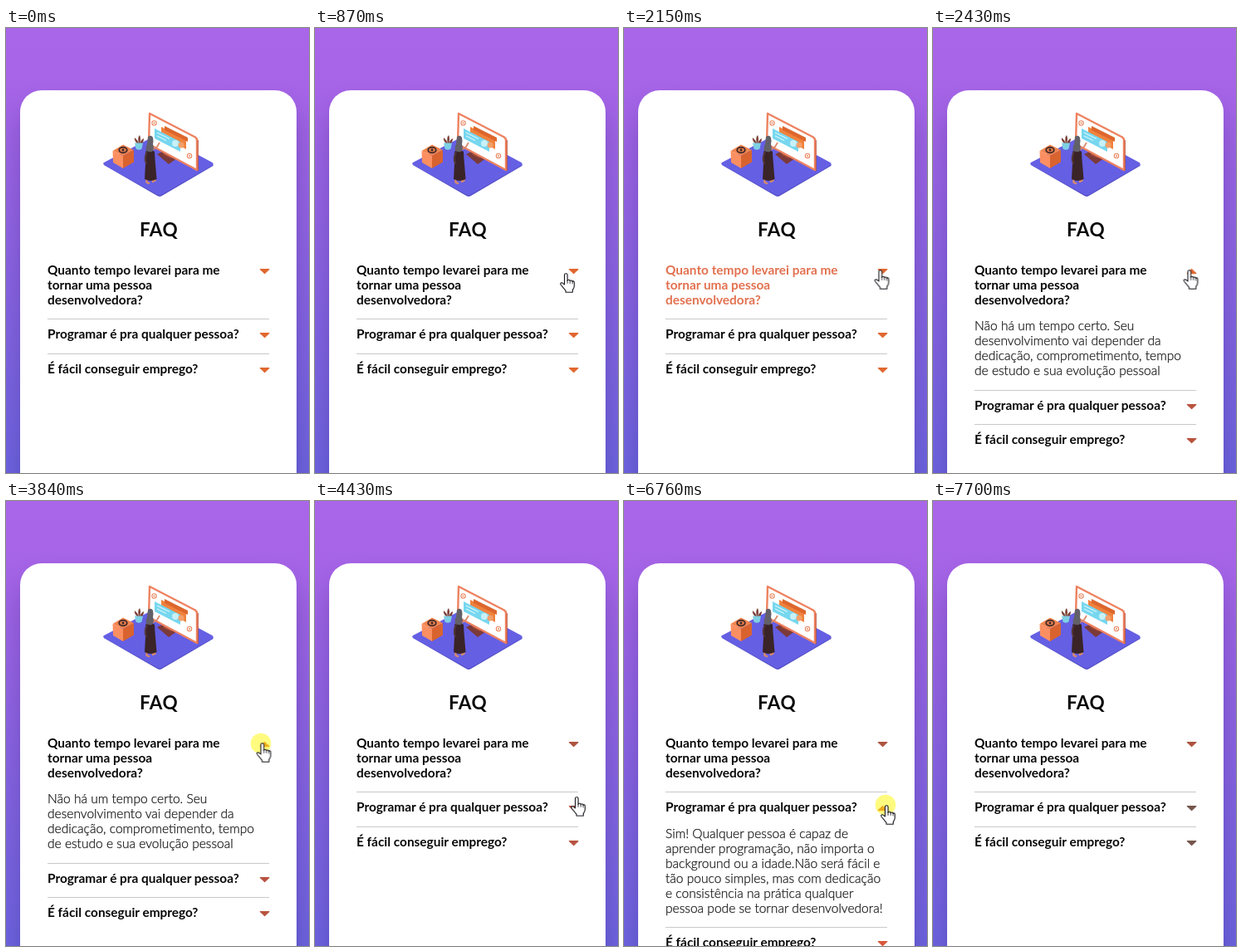
Write an HTML page that moves like this. It is 365 px wide and 536 px high and loops after 8100 ms.

```html
<!DOCTYPE html>
<html lang="pt-BR">
<head>
<meta charset="utf-8">
<title>FAQ</title>
<style>
html, body { margin: 0; width: 100%; height: 100%; overflow: hidden; }
body { position: relative; background: linear-gradient(#aa66e9, #a664e7 13%, #6e64e0); }
.card {
  position: absolute; left: 17px; top: 75px; width: 333px; height: 560px;
  border-radius: 26px; background: #fff; box-shadow: 0 22px 32px rgba(20, 0, 60, .22);
}
svg { position: absolute; left: 0; top: 0; display: block; }
text { font-family: Lato, "Open Sans", sans-serif; fill: #080808; }
.title { font-size: 22.5px; font-weight: 700; letter-spacing: .5px; text-anchor: middle; }
.q text { font-size: 15.4px; font-weight: 700; fill: inherit; }
.q { fill: #080808; }
.a text { font-size: 15.55px; font-weight: 300; fill: #151515; stroke: #151515; stroke-width: .25px; }
.a { opacity: 0; }
.rule { stroke: #c9c9cd; stroke-width: 1; }
.arrow {
  color: #e0672f; fill: currentColor; stroke: currentColor; stroke-linejoin: round;
  transform-box: fill-box; transform-origin: center;
}

/* Everything shares one 8.1 s clock */
.q, .a, .arrow, .mid, .tail, #click, #hand { animation: 8.1s linear infinite; }
.a, .arrow, .mid, .tail, #click { animation-timing-function: step-end; }
#q1 { animation-name: hover1; }
#q2 { animation-name: hover2; }
#a1 { animation-name: show1; }
#a2 { animation-name: show2; }
#t1 { animation-name: flip1; }
#t2 { animation-name: flip2; }
#t3 { animation-name: tint3; }
.mid { animation-name: mid; }
.tail { animation-name: tail; }
#click { animation-name: click; opacity: 0; }
#hand { animation-name: hand; }

@keyframes hover1 {
  0%, 18.15% { fill: #080808; }
  21.48%, 26.54% { fill: #e3714f; }
  30%, 100% { fill: #080808; }
}
@keyframes hover2 {
  0%, 54.69% { fill: #080808; }
  56.6%, 57.28% { fill: #e3714f; }
  59.75%, 100% { fill: #080808; }
}
@keyframes show1 {
  0% { opacity: 0; }
  27.407% { opacity: 1; }
  49.012%, 100% { opacity: 0; }
}
@keyframes show2 {
  0% { opacity: 0; }
  57.284% { opacity: 1; }
  85.185%, 100% { opacity: 0; }
}
@keyframes flip1 {
  0% { transform: none; color: #e0672f; }
  27.407% { transform: scaleY(-1); color: #e0672f; }
  49.012%, 100% { transform: none; color: #ad5440; }
}
@keyframes flip2 {
  0% { transform: none; color: #e0672f; }
  27.407% { transform: none; color: #b8523f; }
  57.284% { transform: scaleY(-1); color: #d4583a; }
  85.185%, 100% { transform: none; color: #75564d; }
}
@keyframes tint3 {
  0% { color: #e0672f; }
  27.407% { color: #b8523f; }
  57.284% { color: #d9573a; }
  85.185%, 100% { color: #75564d; }
}
@keyframes mid {
  0% { transform: none; }
  27.407% { transform: translateY(86px); }
  49.012%, 100% { transform: none; }
}
@keyframes tail {
  0% { transform: none; }
  27.407% { transform: translateY(85px); }
  49.012% { transform: none; }
  57.284% { transform: translateY(121px); }
  85.185%, 100% { transform: none; }
}
@keyframes click {
  0% { opacity: 0; transform: translate(307px, 292px); }
  24.815% { opacity: 1; transform: translate(307px, 292px); }
  26.543% { opacity: 0; transform: translate(307px, 292px); }
  47.407% { opacity: 1; transform: translate(307px, 292px); }
  49.012% { opacity: 0; transform: translate(307px, 292px); }
  55.556% { opacity: 1; transform: translate(315px, 366px); }
  57.284% { opacity: 0; transform: translate(315px, 366px); }
  83.457% { opacity: 1; transform: translate(315px, 366px); }
  85.185%, 100% { opacity: 0; transform: translate(315px, 366px); }
}
@keyframes hand {
  0%, .863% { transform: translate(308px, 468px); opacity: 0; }
  .864% { transform: translate(308px, 468px); opacity: 1; animation-timing-function: ease-out; }
  4.938%, 8.3% { transform: translate(294px, 299px); }
  10.741%, 13.95% { transform: translate(295px, 295px); }
  16.543%, 52.22% { transform: translate(301.5px, 291px); animation-timing-function: ease-in-out; }
  55.556%, 86% { transform: translate(309px, 366px); animation-timing-function: ease-in; }
  95.061% { transform: translate(332px, 530px); opacity: 1; }
  95.062%, 100% { transform: translate(332px, 530px); opacity: 0; }
}
</style>
</head>
<body>
<div class="card"></div>
<svg width="365" height="536" viewBox="0 0 365 536">
  <defs>
    <path id="tri" d="M306.3 290.6H316.9L311.6 295.6Z" stroke-width="1.2"/>
  </defs>

  <g id="scene" stroke-linejoin="round">
    <path d="M118 165 183 202.500Q185.500 203.500 188 202L249.500 166V164H118Z" fill="#544ec6"/>
    <path d="M118 162 181 129Q184 128 187 129L248.500 162Q251 164 248 166L188 200.500Q185 202.500 182 200.500L118.500 165Q116 163.500 118 162Z" fill="#655fe4"/>
    <!-- monitor -->
    <path d="M182 152 190 148 206 157 196 164Z" fill="#7b3a3a"/>
    <path d="M190 144 199 148V157L190 153Z" fill="#a34c35"/>
    <path d="M173 103 228 131.500Q230 133 230 135V171L174 141Q172 140 172 138Z" fill="#fff" stroke="#ee8260" stroke-width="2.4"/>
    <path d="M231.300 135V172" stroke="#bb543b" stroke-width="1"/>
    <path d="M187 119 217 134V146L187 130Z" fill="#f0823d"/>
    <path d="M191 118 219 132V137L191 123Z" fill="#dd662d"/>
    <path d="M179 121 210 137V149L179 133Z" fill="#76d7ef"/>
    <path d="M182 126 197 133.500M182 130 193 135.500" stroke="#d5f5fc" stroke-width="1.3"/>
    <circle cx="204" cy="139" r="4" fill="#c8f0f7"/>
    <circle cx="211" cy="141" r="3.500" fill="#f3a06a"/>
    <g fill="#fff" stroke="#e9855f" stroke-width="1.1">
      <circle cx="178.500" cy="114.500" r="2.700"/>
      <circle cx="221" cy="154" r="2.700"/>
    </g>
    <g fill="#e9855f"><circle cx="178.500" cy="114.500" r="1"/><circle cx="221" cy="154" r="1"/></g>
    <!-- box -->
    <path d="M128.500 148 141 140.500 154 147 141 154Z" fill="#f1854f"/>
    <path d="M128.500 148 141 154V169L129 162Z" fill="#fb8f62"/>
    <path d="M154 147 141 154V169L154 161.500Z" fill="#d9632f"/>
    <ellipse cx="141" cy="147" rx="4.800" ry="3.300" fill="#e07c4a" stroke="#3c2729" stroke-width="1.7"/>
    <circle cx="141" cy="147" r="1.400" fill="#3c2729"/>
    <!-- plant -->
    <path d="M159 140Q154 136 155 132Q159 135 160 139Q158 132 161 129Q163 133 161 139Q163 134 166 133Q166 138 162 141Z" fill="#7c4038"/>
    <path d="M155 138.500H165L163.500 145.500Q160 148 156.500 145.500Z" fill="#7ed0e4"/>
    <!-- woman -->
    <path d="M169.500 180V186L173 187.500M177 180V185L180.500 183" fill="none" stroke="#d98a6c" stroke-width="2.400"/>
    <path d="M176 147 182 143 185 138" fill="none" stroke="#d98a6c" stroke-width="1.800"/>
    <path d="M168 149Q173 144 179 149L179.500 158 181.500 182Q174 186 167 182L168 163Z" fill="#3a2428"/>
    <path d="M170 149Q166 156 169 164" fill="none" stroke="#55383a" stroke-width="2"/>
    <path d="M171 131Q175 128 177 132Q178 136 177 140Q179 145 176 149Q171 150 168.500 147Q168 143 170 140Z" fill="#626068"/>
  </g>

  <text class="title" x="184" y="251">FAQ</text>

  <g class="q" id="q1">
    <text x="50" y="297">Quanto tempo levarei para me</text>
    <text x="50" y="315">tornar uma pessoa</text>
    <text x="50" y="333">desenvolvedora?</text>
  </g>
  <use href="#tri" class="arrow" id="t1"/>
  <g class="a" id="a1">
    <text x="50" y="364">Não há um tempo certo. Seu</text>
    <text x="50" y="382">desenvolvimento vai depender da</text>
    <text x="50" y="400">dedicação, comprometimento, tempo</text>
    <text x="50" y="418">de estudo e sua evolução pessoal</text>
  </g>

  <g class="mid">
    <path class="rule" d="M50 350.500H317"/>
    <g class="q" id="q2"><text x="50" y="374">Programar é pra qualquer pessoa?</text></g>
    <g transform="translate(0 77)"><use href="#tri" class="arrow" id="t2"/></g>
  </g>
  <g class="a" id="a2">
    <text x="50" y="406">Sim! Qualquer pessoa é capaz de</text>
    <text x="50" y="424">aprender programação, não importa o</text>
    <text x="50" y="442">background ou a idade.Não será fácil e</text>
    <text x="50" y="460">tão pouco simples, mas com dedicação</text>
    <text x="50" y="478">e consistência na prática qualquer</text>
    <text x="50" y="496">pessoa pode se tornar desenvolvedora!</text>
  </g>

  <g class="tail">
    <path class="rule" d="M50 392.500H317"/>
    <g class="q"><text x="50" y="416">É fácil conseguir emprego?</text></g>
    <g transform="translate(0 119)"><use href="#tri" class="arrow" id="t3"/></g>
  </g>

  <circle id="click" r="12.300" fill="#fff800" fill-opacity=".5"/>
  <g id="hand" fill="#fff" stroke="#16161c" stroke-width="1.1" stroke-linejoin="round" stroke-linecap="round">
    <path d="M5.500 14V2.600a1.800 1.800 0 0 1 3.600 0V9.500q0-1.300 1.500-1.300t1.600 1.600q0-.9 1.400-.8t1.500 1.500q.3-.8 1.200-.6q1 .2 1 1.600v4q0 3-2 5v2.800H7v-2L1.300 14.500q-1.200-1.900.2-2.600q1.200-.5 2.200.7z"/>
    <path d="M9.100 9.500V12.500M12.200 9.800V12.500M15.100 10.500V13" fill="none" stroke-width=".8"/>
  </g>
</svg>
</body>
</html>
```
